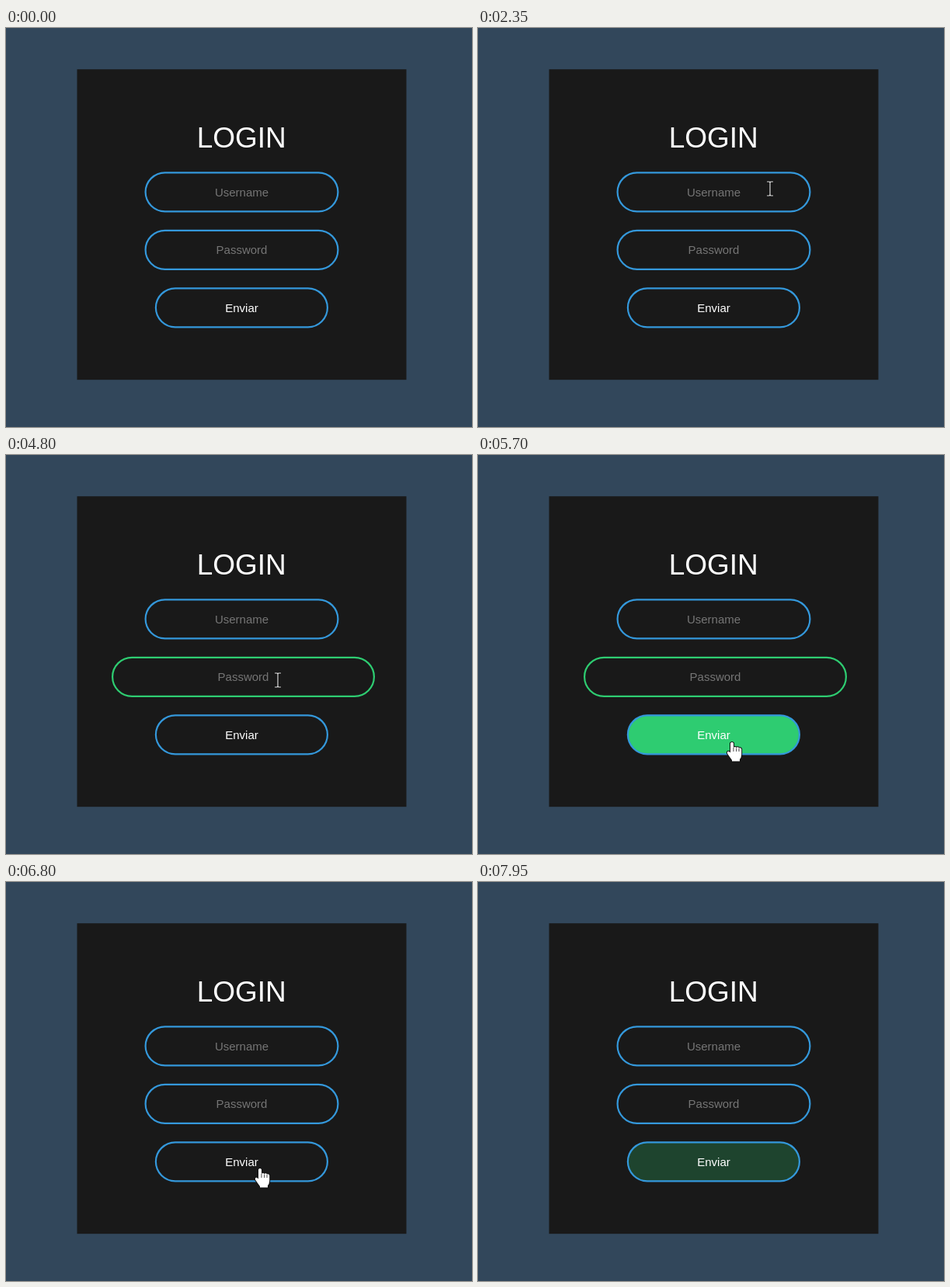
An HTML page with a canvas for the animation above (8000 ms loop, 600 by 514 pixels).

```html
<!DOCTYPE html>
<html lang="es">
<head>
<meta charset="utf-8">
<title>Login</title>
<style>
  html, body { margin: 0; width: 100%; height: 100%; overflow: hidden; background: #32475b; }
  canvas { display: block; }
</style>
</head>
<body>
<canvas id="stage" width="600" height="514"></canvas>
<script>
const ctx = document.getElementById('stage').getContext('2d');
const LOOP = 8000, TRANSITION = 250;
const BLUE = [52, 152, 219], GREEN = [46, 204, 113], GREY = [118, 118, 118];

// Each page load replays the styling transition; hovering starts a little later.
const LOADS = [-LOOP, 6480, 7523];
const HOVERS = [5380, 6862, 7907];
const FOCUS = { username: [2750, 4350], password: [4350, 6180] };

const POINTER = [ // time, x, y
  [900, 33, 530], [1300, 130, 440], [1700, 405, 330], [2000, 548, 250],
  [2350, 376, 207], [2750, 380, 212], [3500, 365, 215], [3750, 358, 233],
  [4200, 350, 285], [4800, 350, 290], [5400, 327, 368], [5700, 327, 370],
  [6800, 327, 369], [7150, 327, 369], [7450, 327, 360], [7900, 327, 360]
];
const HAND = new Path2D('M-2 1.2 Q0 -1.2 2 1.2 V7 Q4 5 5.6 7 Q7.6 5.4 9 7.6 ' +
  'Q11.6 6.6 12.2 9 V16 Q12 20 10 22 V24.5 H0 V23 Q-3 19 -6 14.5 Q-6.6 11 -3.6 12 L-2 13.5 Z');
const KNUCKLES = new Path2D('M2 7 V12 M5.6 7.5 V12 M9 8 V12');
const ARROW = new Path2D('M0 0 V17 L4 13.2 L6.6 19.2 L9.2 18 L6.6 12.2 H12 Z');
const IBEAM = new Path2D('M-4 -9 H-1 L0 -8 L1 -9 H4 M0 -8 V8 M-4 9 H-1 L0 8 L1 9 H4');

const lerp = (a, b, p) => a + (b - a) * p;
const clamp = v => Math.min(1, Math.max(0, v));
const bezier = (a, b, s) => 3 * a * s * (1 - s) ** 2 + 3 * b * s * s * (1 - s) + s ** 3;
const rgb = c => `rgb(${c.join()})`;
const mix = (a, b, p) => a.map((v, i) => lerp(v, b[i], p));

// CSS "ease" timing
function ease(x) {
  if (x <= 0 || x >= 1) return clamp(x);
  let lo = 0, hi = 1;
  for (let i = 0; i < 20; i++) {
    const mid = (lo + hi) / 2;
    if (bezier(.25, .25, mid) < x) lo = mid; else hi = mid;
  }
  return bezier(.1, 1, lo);
}
const since = (t, start) => ease((t - start) / TRANSITION);
const focused = (t, [on, off]) => since(t, on) - since(t, off);

function text(label, x, baseline, size, color) {
  ctx.font = `${size}px "Liberation Sans", Arial, sans-serif`;
  ctx.textAlign = 'center';
  ctx.fillStyle = color;
  ctx.fillText(label, x, baseline);
}

function pill(x, y, w, h, radius, fills, border) {
  const line = 2.2;
  ctx.beginPath();
  ctx.roundRect(x + line / 2, y + line / 2, w - line, h - line, Math.min(radius, (h - line) / 2));
  for (const fill of fills) {
    ctx.fillStyle = fill;
    ctx.fill();
  }
  ctx.lineWidth = line;
  ctx.strokeStyle = rgb(border);
  ctx.stroke();
}

function drawForm(t) {
  const load = LOADS.findLastIndex(start => start <= t);
  const styled = since(t, LOADS[load]);
  const hover = since(t, HOVERS[load]);
  const h = lerp(23, 52.3, styled), gap = lerp(0, 22.2, styled);
  const radius = lerp(0, 26.7, styled);
  const cardHeight = 176.5 + 3 * (h + gap);
  const top = 253.2 - cardHeight / 2;
  const rowTop = i => top + 132 + i * (h + gap);

  ctx.fillStyle = '#191919';
  ctx.fillRect(91.5, top, 424, cardHeight);
  text('LOGIN', 303.2, top + 100.5, 37, '#fff');

  const fields = [['Username', FOCUS.username], ['Password', FOCUS.password]].map(([label, span], i) => {
    const focus = focused(t, span);
    const width = lerp(lerp(230, 250, styled), 339, focus);
    const center = lerp(303.5, 305.5, focus);
    const y = rowTop(i);
    pill(center - width / 2, y, width, h, radius, [`rgba(255,255,255,${1 - styled})`],
      mix(mix(GREY, BLUE, styled), GREEN, focus));
    text(label, center, y + h / 2 + 5.5, 15, '#757575');
    return { x: center - width / 2, y, width, h };
  });

  const y = rowTop(2);
  pill(191.8, y, 223.2, h, radius,
    [`rgba(239,239,239,${1 - styled})`, `rgba(${GREEN},${hover})`], mix(GREY, BLUE, styled));
  text('Enviar', 303.5, y + h / 2 + 5.5, 15, rgb(mix([0, 0, 0], [255, 255, 255], styled)));
  return fields;
}

function pointerAt(t) {
  const next = POINTER.findIndex(p => p[0] > t);
  if (next < 1) return null;
  const [t0, x0, y0] = POINTER[next - 1], [t1, x1, y1] = POINTER[next];
  const s = (t - t0) / (t1 - t0), p = s * s * (3 - 2 * s);
  return [lerp(x0, x1, p), lerp(y0, y1, p)];
}

function drawPointer(t, fields) {
  const at = pointerAt(t);
  if (!at) return;
  const [x, y] = at;
  const overField = fields.some(f => x > f.x && x < f.x + f.width && y > f.y && y < f.y + f.h);
  const outline = (path, width, color) => {
    ctx.lineWidth = width;
    ctx.strokeStyle = color;
    ctx.stroke(path);
  };
  ctx.save();
  ctx.translate(x, y);
  ctx.lineJoin = 'round';
  if (t < HOVERS[0] && overField) {
    outline(IBEAM, 3, '#111');
    outline(IBEAM, 1.2, '#ddd');
  } else {
    const shape = t >= HOVERS[0] ? HAND : ARROW;
    outline(shape, 2, '#111');
    ctx.fillStyle = '#fff';
    ctx.fill(shape);
    if (shape === HAND) outline(KNUCKLES, 0.9, '#333');
  }
  ctx.restore();
}

function frame() {
  const t = performance.now() % LOOP;
  ctx.fillStyle = '#32475b';
  ctx.fillRect(0, 0, 600, 514);
  drawPointer(t, drawForm(t));
  requestAnimationFrame(frame);
}
frame();
</script>
</body>
</html>
```
